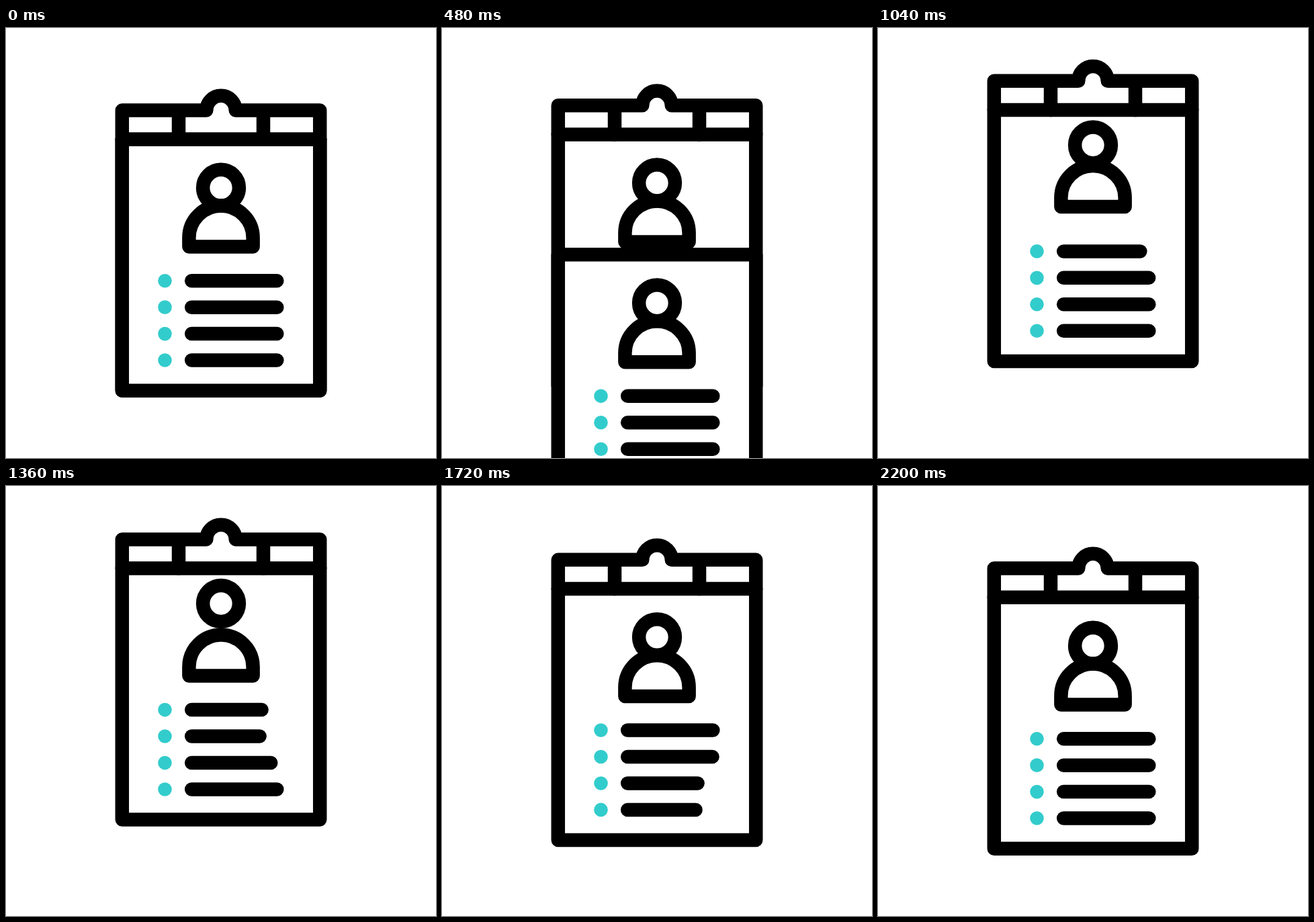
An HTML page for the animation above (2.4 s loop, 640 by 640 pixels).

```html
<!DOCTYPE html>
<html lang="en">
<head>
<meta charset="utf-8">
<title>Clipboard</title>
<style>
  html, body { margin: 0; width: 100%; height: 100%; overflow: hidden; background: #fff; }
  svg { display: block; width: 100%; height: 100%; }
  .ink { fill: none; stroke: #000; stroke-width: 20.5; stroke-linecap: round; stroke-linejoin: round; }
  .paper { fill: #fff; }
  .dot { fill: #33cccc; }
</style>
</head>
<body>
<svg viewBox="0 0 640 640">
  <defs>
    <rect id="paper" class="ink paper" x="172.8" y="165.7" width="294.4" height="374"/>
    <circle id="face" class="ink" cx="320" cy="237.7" r="26.9"/>
    <path id="bust" class="ink" d="M272.4 325.6V312.2A47.6 47.6 0 0 1 367.6 312.2V325.6Z"/>
  </defs>
  <g id="board">
    <use href="#paper"/>
    <path class="ink" d="M172.8 165.7V122.5H298.3A21.7 21.7 0 0 1 341.7 122.5H467.2V165.7M257 122.5V165.7M383 122.5V165.7"/>
    <use id="head" href="#face"/>
    <use id="body" href="#bust"/>
    <g id="rows"></g>
  </g>
  <g id="sheet">
    <use href="#paper"/>
    <use href="#face"/>
    <use href="#bust"/>
    <g id="sheetRows"></g>
  </g>
</svg>
<script>
  const LOOP = 2400, STEP = 40;
  const LINE_END = 403.3;
  const $ = id => document.getElementById(id);
  const [board, head, body, sheet] = ['board', 'head', 'body', 'sheet'].map($);

  function addRows(parent) {
    for (let i = 0; i < 4; i++) {
      const y = 376.2 + i * 39.45;
      parent.innerHTML += `<circle class="dot" cx="236.5" cy="${y}" r="10.3"/>` +
        `<line class="ink" x1="276.2" x2="${LINE_END}" y1="${y}" y2="${y}"/>`;
    }
    return [...parent.querySelectorAll('line')];
  }
  const lines = addRows($('rows'));
  addRows($('sheetRows'));

  const part = (t, from, to) => Math.min(1, Math.max(0, (t - from) / (to - from)));
  const smooth = x => x * x * (3 - 2 * x);

  // Symmetric cubic-bezier(a, 0, 1 - a, 1)
  function steep(x, a = 0.69) {
    let lo = 0, hi = 1;
    for (let i = 0; i < 30; i++) {
      const s = (lo + hi) / 2, r = 1 - s;
      if (3 * a * s * r * r + 3 * (1 - a) * s * s * r + s ** 3 < x) lo = s;
      else hi = s;
    }
    return smooth(lo);
  }

  // Rises from 0 to 1 between a and b, falls back between c and d
  const bump = (t, a, b, c, d) => smooth(part(t, a, b)) - smooth(part(t, c, d));
  const moveY = (el, y) => el.setAttribute('transform', `translate(0 ${y.toFixed(3)})`);

  function draw(t) {
    moveY(board, -44.5 * (steep(part(t, 90, 1190)) - steep(part(t, 1190, 2110))));
    moveY(head, -19.6 * bump(t, 590, 940, 1360, 1680));
    moveY(body, -19.6 * bump(t, 590, 940, 960, 1240));
    lines.forEach((line, i) => {
      const u = t - i * 180;
      line.setAttribute('x2', LINE_END - 29 * bump(u, 840, 1270, 1270, 1570));
    });
    moveY(sheet, 61.5 * (Math.max(0, t - 60) / 260) ** 2.14);
    sheet.style.display = t < 760 ? '' : 'none';
  }

  const start = performance.now();
  function tick() {
    const t = (performance.now() - start) % LOOP;
    draw(Math.floor(t / STEP) * STEP);
    requestAnimationFrame(tick);
  }
  tick();
</script>
</body>
</html>
```
